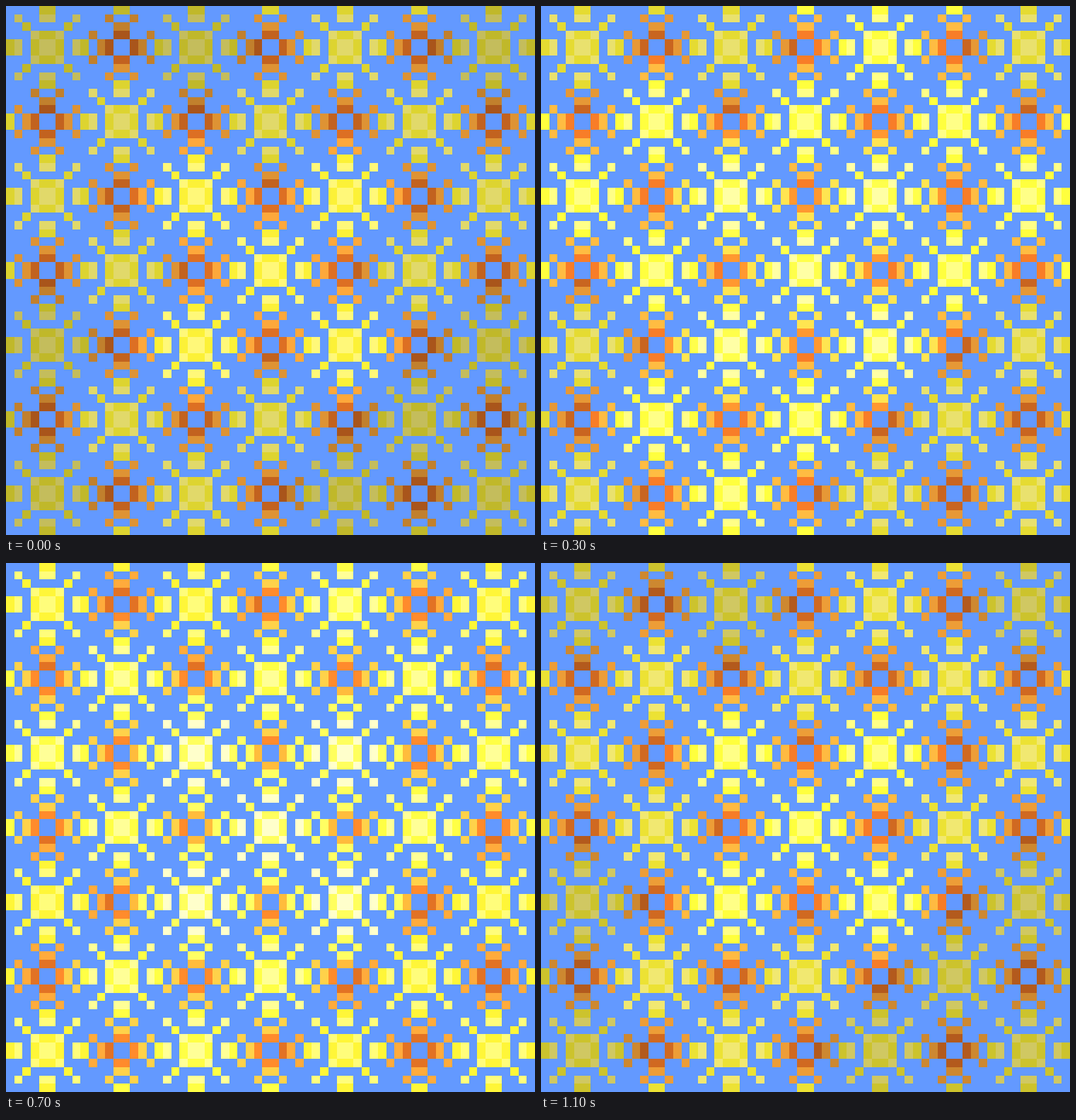
Animation, 748 px wide and 748 px high, one loop 1.2 s. Source, as an HTML page:

```html
<!DOCTYPE html>
<html lang="en">
<head>
<meta charset="utf-8">
<title>Glowing pixel stars</title>
<style>
  html, body { margin: 0; width: 100%; height: 100%; overflow: hidden; background: #6399ff; }
  svg { display: block; width: 100vw; height: 100vh; }
</style>
</head>
<body>
<svg id="stage" viewBox="0 0 748 748" shape-rendering="crispEdges"></svg>
<script>
const STAGE = 748, CELLS = 64, PITCH = 9, STEP_MS = 100, STEPS = 12;

// Brightness zone of each star: dim, middle, inner. The outer ring lies off stage.
const ZONES = [
  '..D.M.M..',
  '.D.D.M.D.',
  'M.M.M.M.M',
  '.M.I.I.M.',
  'M.M.I.M.M',
  '.D.I.I.D.',
  'D.M.M.D.D',
  '.D.M.D.D.',
  '..M.M.D..'
];

const TINTS = {
  pale: [196, 189, 92],
  yellow: [192, 184, 42],
  rust: [169, 85, 27],
  amber: [193, 128, 45]
};

const MIDDLE = [1.15, 1.29, 1.38, 1.47, 1.56, 1.64, 1.72, 1.64, 1.56, 1.47, 1.35, 1.23];
const rise = step => 6 - Math.abs(6 - step);
const GLOW = {
  D: step => 1.06 ** rise(step),
  M: step => MIDDLE[step],
  I: step => 1.31 * 1.11 ** rise(step)
};

const px = cell => Math.round(cell * STAGE / CELLS);

function cellRect(x, y, w, h) {
  const left = px(x), top = px(y);
  return `M${left} ${top}H${px(x + w)}V${px(y + h)}H${left}Z`;
}

// Boxes of one star as offsets from its centre, grouped by tint.
function starBoxes() {
  const boxes = { pale: [[-1, -1, 2, 2]], yellow: [], rust: [], amber: [] };
  const mirrored = (tint, near, across, size) => {
    for (const along of [near, -near - 1]) {
      boxes[tint].push([along, across, 1, size], [across, along, size, 1]);
    }
  };
  const corners = (tint, near) => {
    for (const x of [near, -near - 1])
      for (const y of [near, -near - 1]) boxes[tint].push([x, y, 1, 1]);
  };
  corners('pale', 1);
  corners('yellow', 2);
  corners('pale', 3);
  mirrored('yellow', 1, -1, 2);
  mirrored('pale', 3, -1, 2);
  mirrored('yellow', 4, -1, 2);
  mirrored('amber', 5, -2, 1);
  mirrored('amber', 5, 1, 1);
  mirrored('amber', 6, -1, 2);
  mirrored('rust', 7, -1, 2);
  return boxes;
}

function buildLayers() {
  const svg = document.getElementById('stage');
  const star = starBoxes();
  const layers = [];
  for (const zone of Object.keys(GLOW)) {
    for (const tint of Object.keys(TINTS)) {
      let d = '';
      ZONES.forEach((row, r) => [...row].forEach((mark, c) => {
        if (mark !== zone) return;
        const cx = c * PITCH - 4, cy = r * PITCH - 4;
        for (const [x, y, w, h] of star[tint]) d += cellRect(cx + x, cy + y, w, h);
      }));
      const path = document.createElementNS('http://www.w3.org/2000/svg', 'path');
      path.setAttribute('d', d);
      svg.append(path);
      layers.push({ path, zone, tint });
    }
  }
  return layers;
}

const layers = buildLayers();

function draw(ms) {
  const step = Math.floor(ms / STEP_MS) % STEPS;
  for (const { path, zone, tint } of layers) {
    const glow = GLOW[zone](step);
    const rgb = TINTS[tint].map(v => Math.min(255, Math.round(v * glow)));
    path.setAttribute('fill', `rgb(${rgb})`);
  }
}

const start = performance.now();
function tick() {
  draw(performance.now() - start);
  requestAnimationFrame(tick);
}
tick();
</script>
</body>
</html>
```
